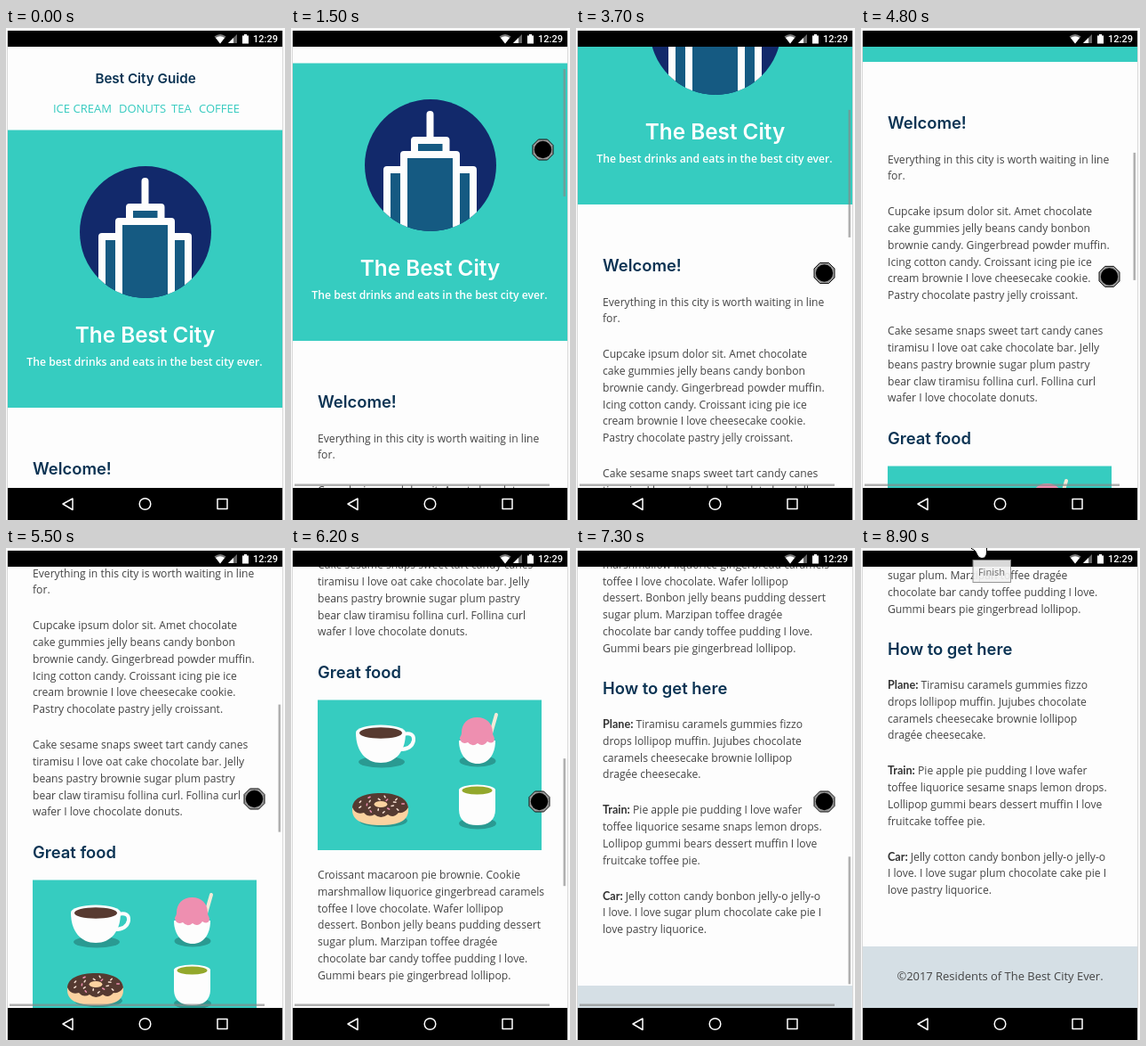
An HTML page that plays this animation: 314 by 552 pixels, repeating every 9 s.

```html
<!DOCTYPE html>
<html lang="en">
<head>
<meta charset="utf-8">
<title>Best City Guide</title>
<style>
  html, body { margin: 0; width: 100%; height: 100%; overflow: hidden; background: #fafafa; }
  svg { display: block; width: 100vw; height: 100vh; }
  text { font-family: "Open Sans", "Noto Sans", sans-serif; font-size: 12.15px; fill: #444; white-space: pre; }
  .head { font-family: Inter, "Noto Sans", sans-serif; font-weight: 600; font-size: 18.4px; fill: #0b3353; font-optical-sizing: none; }
  .lead { font-family: Lato, sans-serif; font-weight: 700; font-size: 12.6px; fill: #333; }
  .nav { font-size: 13px; fill: #36cbc0; }
  .mid { text-anchor: middle; }
</style>
</head>
<body>
<svg viewBox="0 0 314 552" preserveAspectRatio="none">
  <defs>
    <clipPath id="view"><rect x="2" y="21" width="309" height="495"/></clipPath>
    <clipPath id="disc"><circle cx="157" cy="229" r="74"/></clipPath>
  </defs>

  <rect width="314" height="552" fill="#fafafa"/>
  <path d="M1.5 3V552M311.5 3V552" stroke="#d9d9d9"/>
  <rect x="2" y="21" width="309" height="495" fill="#fdfdfd"/>

  <g clip-path="url(#view)">
    <g id="page">
      <text class="head mid" x="157" y="62" style="font-size:15.2px">Best City Guide</text>
      <text class="nav" x="53" y="95">ICE CREAM</text>
      <text class="nav" x="127" y="95">DONUTS</text>
      <text class="nav" x="186" y="95">TEA</text>
      <text class="nav" x="217" y="95">COFFEE</text>

      <rect x="2" y="114.5" width="309" height="311.5" fill="#36ccc0"/>
      <g clip-path="url(#disc)">
        <rect x="80" y="150" width="154" height="158" fill="#12296b"/>
        <g fill="#155a82" stroke="#fdfdfd" stroke-width="8" stroke-linejoin="round" stroke-linecap="round">
          <path d="M156.5 201V172"/>
          <path d="M139 217V201H174.5V217"/>
          <path d="M108 312V234H127V312M205 312V234H186V312"/>
          <path d="M127 312V217H186V312"/>
        </g>
      </g>
      <text class="head mid" x="156.5" y="353" style="font-size:24.3px;fill:#fff">The Best City</text>
      <text class="mid" x="156" y="379" style="font-weight:600;font-size:12.2px;fill:#fff">The best drinks and eats in the best city ever.</text>

      <g id="copy"></g>

      <g transform="translate(0 709)">
        <rect x="30" y="170.5" width="252" height="168.5" fill="#36ccc0"/>
        <g fill="#2a9a92">
          <ellipse cx="102" cy="240" rx="26" ry="6.5"/>
          <ellipse cx="210" cy="239" rx="20.5" ry="6.5"/>
          <ellipse cx="104" cy="306" rx="27" ry="7"/>
          <ellipse cx="210" cy="309" rx="21" ry="6.5"/>
        </g>
        <g fill="#fdfdfd">
          <path d="M126 209Q139 206 138 216Q136 226 122 226" fill="none" stroke="#fdfdfd" stroke-width="4"/>
          <path d="M73 207C73 228 84 241 101 241S129 228 129 207Z"/>
          <ellipse cx="101" cy="207" rx="28" ry="8.5"/>
          <path d="M189 216H230C230 232 222 242 210 242S189 232 189 216Z"/>
          <path d="M189 271V293C189 305 196 311 209.500 311S230 305 230 293V271Z"/>
          <ellipse cx="209.500" cy="271.500" rx="20.500" ry="6"/>
        </g>
        <ellipse cx="101" cy="207.500" rx="24" ry="6.300" fill="#573a30"/>
        <ellipse cx="209.500" cy="272" rx="17" ry="4.500" fill="#93a82c"/>

        <path d="M231 187L225 208" stroke="#f3ead8" stroke-width="4" stroke-linecap="round"/>
        <path d="M190 214C190 211 192 211 192 207C192 197 199 190 209.500 190S227 197 227 207C227 211 229 211 229 215Q227 221 221 217Q216 224 210 219Q204 224 199 218Q192 221 190 214Z" fill="#ee8fb0"/>

        <path d="M69 294C69 281 82 276 101 276S132 281 132 294C132 306 121 311 101 311S69 306 69 294Z" fill="#fbd2a0"/>
        <path d="M69 291C70 280 83 275 101 275S131 281 132 291Q128 298 121 297Q115 304 109 299Q101 305 94 299Q87 303 82 297Q73 300 69 291Z" fill="#553a31"/>
        <g id="sprinkles" stroke-width="1.5" stroke-linecap="round"></g>
        <ellipse cx="101" cy="287.500" rx="7.500" ry="3.500" fill="#fbd2a0"/>
      </g>

      <rect x="2" y="1567" width="309" height="69" fill="#d5dfe5"/>
      <text class="mid" x="156.500" y="1605" style="font-size:12.95px">©2017 Residents of The Best City Ever.</text>
    </g>
    <g id="bars" fill="#888" fill-opacity=".65">
      <rect x="4" y="511.500" width="287" height="2.500"/>
      <rect id="thumb" x="306.500" width="2.500" height="143"/>
    </g>
  </g>

  <rect x="2" y="3" width="309" height="18"/>
  <path d="M234.500 9.500Q241 4.500 247.500 9.500L241 17.500Z" fill="#777"/>
  <path d="M236 11Q241 7.500 246 11L241 17.500Z" fill="#fff"/>
  <path d="M250 17H260V7Z" fill="#666"/>
  <path d="M250 17H256V11Z" fill="#fff"/>
  <path d="M266 8.500H268V7H271V8.500H273V17.500H266Z" fill="#fff"/>
  <text x="278" y="16" style="font:500 11px Roboto,sans-serif;fill:#fff">12:29</text>

  <rect x="2" y="516" width="309" height="36"/>
  <g fill="none" stroke="#fff" stroke-width="1.500" stroke-linejoin="round">
    <path d="M64 534L75 528V540.500Z"/>
    <circle cx="156.500" cy="534" r="6.300"/>
    <rect x="238" y="528.500" width="11" height="11"/>
  </g>

  <g id="cursor">
    <path d="M-5-11.500H5L11.500-5V5L5 11.500H-5L-11.500 5V-5Z" fill="#999" stroke="#111"/>
    <circle r="9.700"/>
  </g>
  <path id="hand" d="M124.500-2V1Q127 1 129 4L131 8Q132.500 11.500 136 11.500Q141.500 11.500 141.500 4V-2Z" fill="#fff" stroke="#000"/>
  <g id="tip">
    <rect x="126" y="13.500" width="42.500" height="25" fill="#f1f1f1" stroke="#8a8a8a"/>
    <text class="mid" x="147" y="31" style="font:11px 'Noto Sans',sans-serif;fill:#666">Finish</text>
  </g>
</svg>

<script>
const LOOP = 9000, STEP = 100, LEADING = 18.8, GAP = 21.1;
const el = id => document.getElementById(id);
const clamp = k => Math.min(1, Math.max(0, k));

const sections = [
  { title: 'Welcome!', y: 501, top: 539.5, body: `Everything in this city is worth waiting in line
for.

Cupcake ipsum dolor sit. Amet chocolate
cake gummies jelly beans candy bonbon
brownie candy. Gingerbread powder muffin.
Icing cotton candy. Croissant icing pie ice
cream brownie I love cheesecake cookie.
Pastry chocolate pastry jelly croissant.

Cake sesame snaps sweet tart candy canes
tiramisu I love oat cake chocolate bar. Jelly
beans pastry brownie sugar plum pastry
bear claw tiramisu follina curl. Follina curl
wafer I love chocolate donuts.` },
  { title: 'Great food', y: 855, top: 1080, body: `Croissant macaroon pie brownie. Cookie
marshmallow liquorice gingerbread caramels
toffee I love chocolate. Wafer lollipop
dessert. Bonbon jelly beans pudding dessert
sugar plum. Marzipan toffee dragée
chocolate bar candy toffee pudding I love.
Gummi bears pie gingerbread lollipop.` },
  { title: 'How to get here', y: 1240, top: 1278, body: `Plane: Tiramisu caramels gummies fizzo
drops lollipop muffin. Jujubes chocolate
caramels cheesecake brownie lollipop
dragée cheesecake.

Train: Pie apple pie pudding I love wafer
toffee liquorice sesame snaps lemon drops.
Lollipop gummi bears dessert muffin I love
fruitcake toffee pie.

Car: Jelly cotton candy bonbon jelly-o jelly-o
I love. I love sugar plum chocolate cake pie I
love pastry liquorice.` }
];

function typeset({ title, y, top, body }) {
  const heading = `<text class="head" x="30" y="${y}">${title}</text>`;
  return heading + body.split('\n').map(line => {
    const base = top;
    top += line ? LEADING : GAP;
    const inner = line.replace(/^\w+:/, '<tspan class="lead">$&</tspan>');
    return `<text x="30" y="${base}">${inner}</text>`;
  }).join('');
}
el('copy').innerHTML = sections.map(typeset).join('');

let seed = 7;
const random = () => (seed = seed * 16807 % 2147483647) / 2147483647;

// Sprinkles lie on two rings around the hole of the donut.
el('sprinkles').innerHTML = Array.from({ length: 18 }, (_, i) => {
  const angle = i * Math.PI / 9, ring = i % 2 ? 0.55 : 0.85, tilt = random() * Math.PI;
  const x = 101 + 28 * ring * Math.cos(angle), y = 287 + 10.5 * ring * Math.sin(angle);
  return `<path d="M${x} ${y}l${2.5 * Math.cos(tilt)} ${1.8 * Math.sin(tilt)}"
    stroke="${i % 3 ? '#f6dfd2' : '#ee8fb0'}"/>`;
}).join('');

// Each move runs evenly and adds to the page scroll and to the cursor place.
const moves = [
  { start: 600, time: 400, x: 34 },
  { start: 1200, time: 300, scroll: 75, x: 33.5, y: 7.5 },
  { start: 1700, time: 600, x: -87.5, y: 66 },
  { start: 2500, time: 400, x: -30 },
  { start: 3100, time: 600, scroll: 153, x: 113.5, y: 72.5 },
  { start: 4100, time: 900, scroll: 206, y: 5 },
  { start: 5300, time: 600, scroll: 219, y: 4.5 },
  { start: 6100, time: 600, scroll: 335 },
  { start: 6900, time: 600, scroll: 132 },
  { start: 7800, time: 300, x: -100, y: -222 }
];

const total = (key, t) => moves.reduce(
  (sum, m) => sum + (m[key] || 0) * clamp((t - m.start) / m.time), 0);

const pulse = (t, on, off) => clamp((t - on) / 100) * (1 - clamp((t - off) / 400));
const show = (id, opacity) => el(id).setAttribute('opacity', opacity);
const place = (id, x, y) => el(id).setAttribute('transform', `translate(${x} ${y})`);

function draw(time) {
  const t = Math.floor(time % LOOP / STEP) * STEP;
  const scroll = Math.round(total('scroll', t));
  place('page', 0, -scroll);
  place('cursor', 216 + total('x', t), 129 + total('y', t));
  el('thumb').setAttribute('y', 23.5 + scroll * 0.3);
  show('bars', pulse(t, 1200, 1700) + pulse(t, 3100, 7800));
  show('cursor', t >= 200 && t < 8200 ? 1 : 0);
  show('hand', t >= 8500 ? 1 : 0);
  show('tip', 0.9 * clamp((t - 8700) / 200));
}

const start = performance.now();
function tick() {
  draw(performance.now() - start);
  requestAnimationFrame(tick);
}
tick();
</script>
</body>
</html>
```
